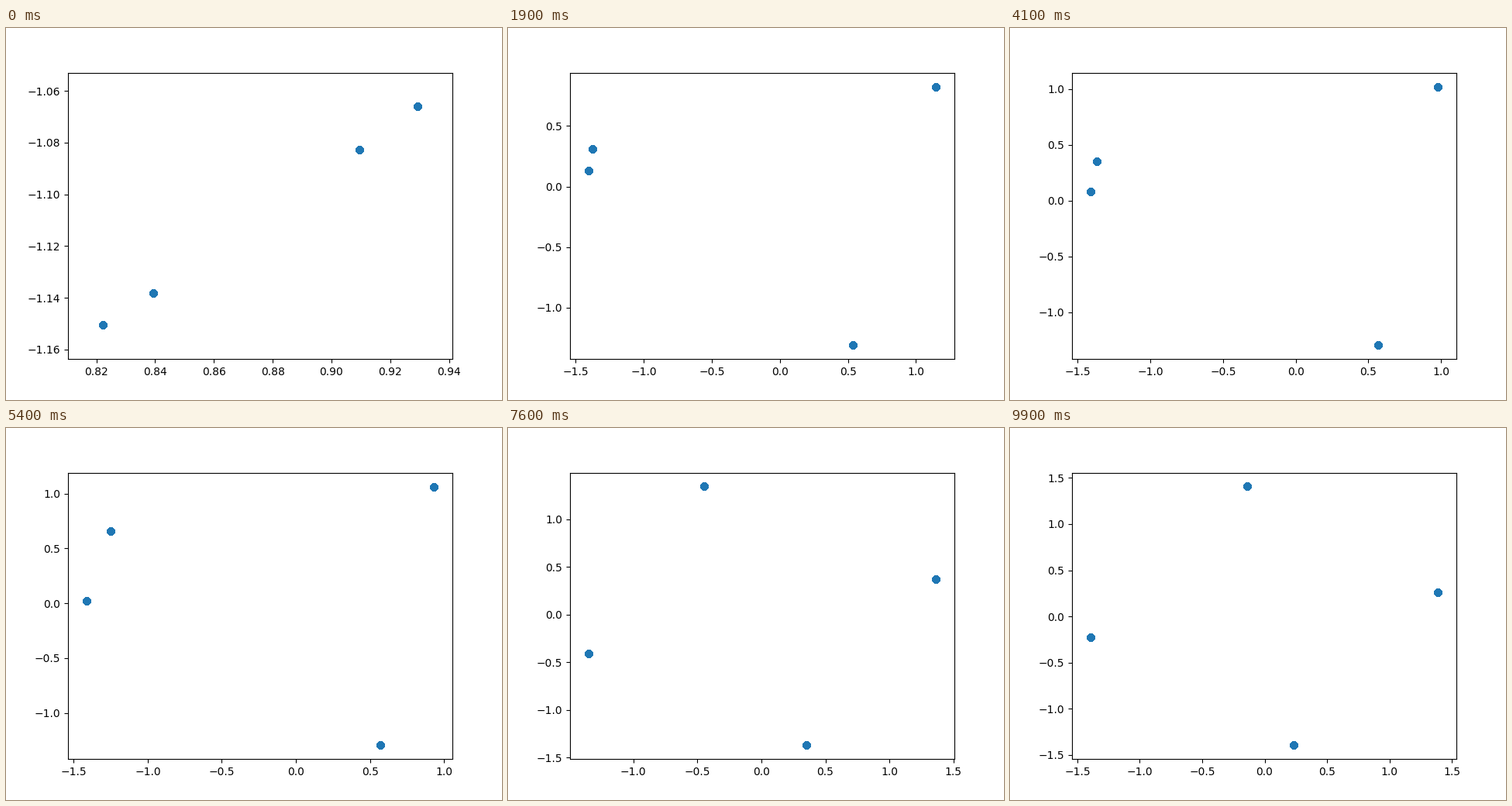
Write a matplotlib script that moves like this. It is 640x480 px and loops after 10 s.

```python
import numpy as np
import matplotlib.pyplot as plt
from matplotlib.animation import FuncAnimation

FRAMES = 100
RADIUS = np.sqrt(2)
COPIES = 500              # samples stacked on each point
PAD = (3 / 496, 3 / 369.6)
MARGIN = 0.05

# Angles in degrees: a tight cluster bursts apart, then drifts to quarter turns
START = np.array([-54.445, -53.59, -49.97, -48.927])
KEYS = np.array([19, 41, 54, 65, 76, 99])
DRIFT = np.array([
    [-192.7, -194.34, -207.7, -232.7, -251.6, -264.3],
    [-185.3, -183.25, -180.8, -163.6, -163.06, -171.0],
    [-67.8, -66.4, -66.2, -66.9, -75.7, -80.5],
    [35.7, 46.2, 48.75, 30.1, 15.1, 10.5],
])
SLOPES = np.gradient(DRIFT, KEYS, axis=1)
SLOPES[:, -1] = 0


def smoothstep(s):
    return s * s * (3 - 2 * s)


def angles_at(t):
    if t < KEYS[0]:
        return START + (DRIFT[:, 0] - START) * smoothstep((t / KEYS[0]) ** 0.75)
    k = min(np.searchsorted(KEYS, t, side="right") - 1, len(KEYS) - 2)
    h = KEYS[k + 1] - KEYS[k]
    s = (t - KEYS[k]) / h
    a, b = DRIFT[:, k], DRIFT[:, k + 1]
    bend = SLOPES[:, k] * (1 - s) - SLOPES[:, k + 1] * s
    return a + (b - a) * smoothstep(s) + h * s * (1 - s) * bend


def limits(values, pad):
    lo, hi = values.min() - pad, values.max() + pad
    extra = MARGIN * (hi - lo)
    return lo - extra, hi + extra


fig, ax = plt.subplots(figsize=(6.4, 4.8), dpi=100)
dots = ax.scatter(np.zeros(4 * COPIES), np.zeros(4 * COPIES), color="#1f77b4")


def update(i):
    theta = np.radians(angles_at(i))
    x, y = RADIUS * np.cos(theta), RADIUS * np.sin(theta)
    dots.set_offsets(np.tile(np.column_stack([x, y]), (COPIES, 1)))
    ax.set_xlim(limits(x, PAD[0]))
    ax.set_ylim(limits(y, PAD[1]))
    return (dots,)


anim = FuncAnimation(fig, update, frames=FRAMES, interval=100,
                     repeat=True, repeat_delay=0, blit=False)
plt.show()
```
